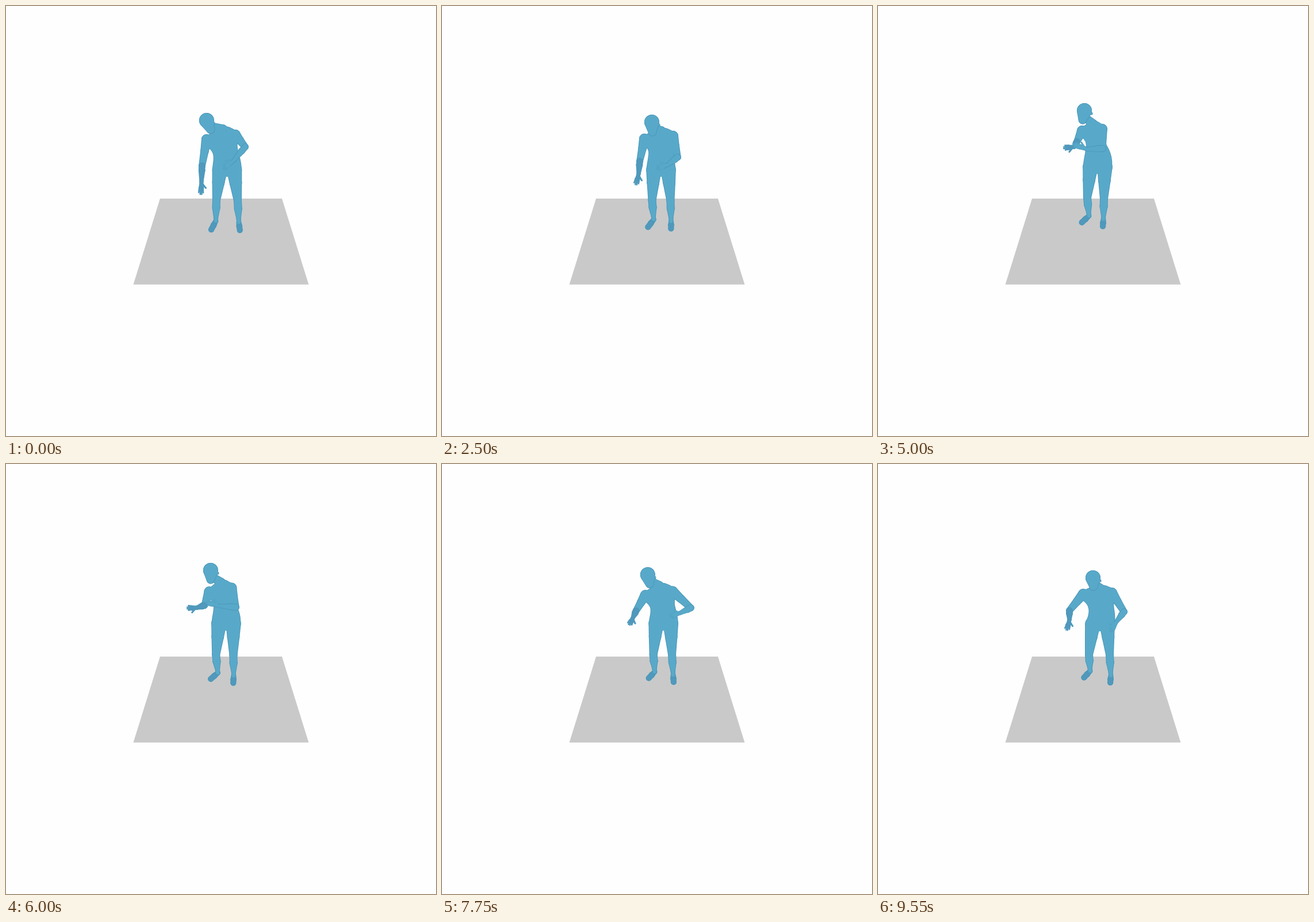
Recreate the animation shown at these times as an HTML page with a canvas. Size 748 by 748 pixels, loop 9.6 s.

```html
<!DOCTYPE html>
<html lang="en">
<head>
<meta charset="utf-8">
<title>Figure study</title>
<style>
html, body { margin: 0; width: 100%; height: 100%; overflow: hidden; background: #fefefe; }
canvas { display: block; width: 748px; height: 748px; }
</style>
</head>
<body>
<canvas id="stage" width="748" height="748"></canvas>
<script>
const ctx = document.getElementById('stage').getContext('2d');
const LOOP = 9600, STEP = 50;
const MAIN = '#58a9c9', EDGE = '#4b96b8', SHADE = '#5099bc';
const tracks = {};

// A pose names only the joints it pins; the others glide through.
function pose(t, joints) {
  for (const name in joints) (tracks[name] ||= []).push([t, ...joints[name]]);
}
const head = (cx, cy, jx, jy, nx, ny) => ({ crown: [cx, cy], jaw: [jx, jy], neck: [nx, ny] });
const arm = (s, ex, ey, wx, wy, tx, ty) =>
  ({ [s + 'Elbow']: [ex, ey], [s + 'Wrist']: [wx, wy], [s + 'Tip']: [tx, ty] });
const trunk = (lx, ly, rx, ry, wx, wy, px, py) =>
  ({ lSho: [lx, ly], rSho: [rx, ry], waist: [wx, wy], hip: [px, py] });
const leg = (s, kx, ky, ax, ay, tx, ty) =>
  ({ [s + 'Knee']: [kx, ky], [s + 'Ankle']: [ax, ay], [s + 'Toe']: [tx, ty] });

pose(0, { ...head(349, 199, 356, 215, 377, 214), ...trunk(349, 232, 399, 224, 384.5, 262, 384.5, 285),
  ...arm('l', 341, 278, 340, 305, 339, 330), ...arm('r', 416, 245, 396, 269, 377, 284),
  ...leg('l', 366, 337, 365, 374, 356, 391), ...leg('r', 403, 338, 405, 376, 407, 392) });
pose(450, arm('l', 339, 274, 336, 303, 331, 326));
pose(1000, { ...head(361, 183, 363, 200, 379, 207), ...trunk(351, 223, 402, 217, 383, 260, 383, 285),
  ...arm('l', 345, 267, 345, 291, 342, 312), ...arm('r', 418, 252, 398, 270, 378, 284) });
pose(1500, { ...head(363, 201, 363, 219, 381, 217), ...trunk(351, 231, 401, 225, 382, 267, 382.5, 286),
  ...arm('l', 348, 274, 358, 299, 366, 320), ...arm('r', 412, 262, 395, 281, 374, 296),
  ...leg('l', 365, 337, 367, 373, 357, 389), ...leg('r', 399, 338, 402, 375, 403, 390) });
pose(2500, { ...head(365, 202, 366, 219, 381, 217), ...trunk(352, 231, 402, 226, 381, 265, 381, 285),
  ...arm('l', 344, 270, 342, 292, 337, 313), ...arm('r', 410, 263, 393, 276, 372, 284) });
pose(3000, head(367, 198, 367, 214, 380, 214));
pose(3500, { ...head(369, 178, 369, 192, 378, 206), ...trunk(355, 217, 402, 216, 380, 255, 380, 284),
  ...arm('l', 348, 256, 349, 277, 347, 296), ...arm('r', 408, 256, 390, 264, 366, 265),
  ...leg('l', 366, 338, 369, 369, 357, 383), ...leg('r', 396, 338, 395, 374, 394, 388) });
pose(4100, { ...head(364, 173, 362, 189, 376, 202), ...trunk(354, 212, 398, 211, 381, 254, 381, 283),
  ...arm('l', 338, 237, 322, 240, 302, 243), ...arm('r', 397, 249, 369, 250, 344, 245) });
pose(5000, { ...head(359, 182, 356, 198, 374, 205), ...trunk(355, 217, 390, 214, 383, 255, 382, 280),
  ...arm('l', 346, 236, 341, 245, 321, 247), ...arm('r', 391, 248, 363, 249, 337, 240),
  ...leg('l', 364, 333, 367, 365, 353, 378), ...leg('r', 393, 335, 392, 371, 391, 385) });
pose(6000, { ...head(356, 185, 356, 201, 374, 206), ...arm('r', 400, 249, 372, 247, 346, 240) });
pose(6400, arm('l', 345, 252, 330, 253, 311, 253));
pose(7000, { ...head(350, 194, 356, 209, 375, 211), ...trunk(352, 226, 397, 217, 384, 255, 384, 276),
  ...arm('l', 347, 263, 356, 268, 357, 281), ...arm('r', 413, 242, 392, 237, 366, 229),
  ...leg('l', 367, 331, 370, 362, 357, 374), ...leg('r', 399, 331, 401, 367, 401, 381) });
pose(7600, { ...head(356, 192, 360, 208, 377, 211), ...arm('l', 337, 255, 331, 266, 323, 280),
  ...arm('r', 434, 248, 416, 255, 397, 261) });
pose(8500, { ...head(367.5, 199, 368, 215, 382, 217), ...trunk(356, 229, 405, 225, 388, 260, 386, 279),
  ...arm('l', 344, 261, 348, 281, 348, 299), ...arm('r', 419, 261, 402, 273, 381, 281),
  ...leg('l', 368, 331, 370, 361, 359, 374), ...leg('r', 401, 331, 403, 367, 404, 381) });
pose(9550, { ...head(374, 198, 375, 213, 386, 216), ...trunk(357, 226, 407, 224, 390, 260, 386, 279),
  ...arm('l', 333, 255, 333, 271, 328, 291), ...arm('r', 428, 257, 415, 274, 404, 293),
  ...leg('l', 367, 331, 369, 360, 357, 373), ...leg('r', 403, 331, 405, 368, 404, 382) });

// Monotone cubic through the keys, so nothing overshoots.
function sample(keys, t) {
  const last = keys.length - 1;
  if (t >= keys[last][0]) return keys[last].slice(1);
  let i = 0;
  while (keys[i + 1][0] <= t) i++;
  const span = keys[i + 1][0] - keys[i][0], u = (t - keys[i][0]) / span;
  const slope = (n, a) => (keys[n + 1][a] - keys[n][a]) / (keys[n + 1][0] - keys[n][0]);
  const tangent = (n, a) => {
    if (n === 0) return slope(0, a);
    if (n === last) return slope(last - 1, a);
    const p = slope(n - 1, a), q = slope(n, a);
    return p * q > 0 ? 2 * p * q / (p + q) : 0;
  };
  return [1, 2].map(a => {
    const p = keys[i][a], q = keys[i + 1][a];
    const v = u * u * (3 - 2 * u);
    return p + (q - p) * v + span * u * (1 - u) * (tangent(i, a) * (1 - u) - tangent(i + 1, a) * u);
  });
}

const mix = (a, b, k) => [a[0] + (b[0] - a[0]) * k, a[1] + (b[1] - a[1]) * k];
const add = (p, x, y) => [p[0] + x, p[1] + y];

// Tapered limb: a run of [point, radius] pairs.
function limb(run, inset = 0) {
  run.forEach(([p, radius], i) => {
    const r = Math.max(radius - inset, 0.4);
    ctx.beginPath();
    ctx.arc(p[0], p[1], r, 0, 7);
    ctx.fill();
    if (!i) return;
    const [o, before] = run[i - 1], s = Math.max(before - inset, 0.4);
    const dx = p[0] - o[0], dy = p[1] - o[1], len = Math.hypot(dx, dy);
    if (len <= Math.abs(r - s)) return;
    const a = Math.atan2(dy, dx), b = Math.acos((s - r) / len);
    ctx.beginPath();
    ctx.arc(o[0], o[1], s, a + b, a - b + 2 * Math.PI);
    ctx.arc(p[0], p[1], r, a - b, a + b);
    ctx.fill();
  });
}

function blob(pts) {
  ctx.beginPath();
  pts.forEach((p, i) => {
    const m = mix(p, pts[(i + 1) % pts.length], 0.5);
    if (!i) ctx.moveTo(...mix(pts[pts.length - 1], p, 0.5));
    ctx.quadraticCurveTo(...p, ...m);
  });
  ctx.fill();
}

function torso(j, e) {
  const { neck, lSho, rSho, waist, hip } = j;
  blob([
    add(neck, 3, e - 7), add(rSho, -2, e - 10), add(rSho, 9 - e, -1), add(rSho, 2 - e, 18),
    add(waist, 22.5 - e, 0), add(hip, 26.5 - e, 0), add(hip, 17 - e, 15), add(hip, 0, 11),
    add(hip, e - 17, 15), add(hip, e - 26.5, 0), add(waist, e - 22.5, 0),
    add(lSho, 8 + e, 18), add(lSho, e - 8, 6), add(lSho, 2, e - 9)
  ]);
}

function thighAndCalf(j, s, e) {
  const root = add(j.hip, s === 'l' ? -12.5 : 12.5, 0);
  const knee = j[s + 'Knee'], ankle = j[s + 'Ankle'];
  limb([[root, 13.3], [mix(root, knee, 0.42), 10.8], [knee, 7],
    [mix(knee, ankle, 0.38), 7], [mix(knee, ankle, 0.85), 4], [ankle, 4]], e);
}

function foot(j, s) {
  const ankle = j[s + 'Ankle'], toe = mix(j[s + 'Toe'], j[s + 'Ankle'], 0.12);
  const run = [[ankle, 4.3], [mix(ankle, toe, 0.5), 5.2], [toe, 5]];
  ctx.fillStyle = EDGE;
  limb(run);
  ctx.fillStyle = SHADE;
  limb(run, 1);
}

function upperArm(j, s, e) {
  const sho = j[s + 'Sho'], elbow = j[s + 'Elbow'];
  limb([[sho, 9], [mix(sho, elbow, 0.45), 7.2], [elbow, 5.8]], e);
}

function forearm(j, s, e) {
  const elbow = j[s + 'Elbow'], wrist = j[s + 'Wrist'], tip = j[s + 'Tip'];
  limb([[elbow, 5.8], [mix(elbow, wrist, 0.3), 5.8], [wrist, 3.6]], e);
  const len = Math.hypot(tip[0] - wrist[0], tip[1] - wrist[1]) || 1;
  const dx = (tip[0] - wrist[0]) / len, dy = (tip[1] - wrist[1]) / len;
  const side = s === 'l' ? 1 : -1;
  const at = (along, across) =>
    add(wrist, dx * along + dy * across * side, dy * along - dx * across * side);
  limb([[wrist, 3.4], [at(len * 0.45, 0), 4.2]], e);
  const slim = e * 0.3;
  [-3.6, -1.2, 1.2, 3.6].forEach(f =>
    limb([[at(len * 0.45, f * 0.8), 1.7], [at(len * (1 - Math.abs(f) * 0.05) - 1, f * 1.1), 1.1]], slim));
  limb([[at(len * 0.2, 2), 2], [at(len * 0.45, 8), 1.3]], slim);
}

function skull(j, e) {
  const { crown, jaw } = j;
  limb([[crown, 13], [jaw, 7.4]], e);
  limb([[add(crown, 12, 5), 2.6]], e);
}

function draw(t) {
  const j = {};
  for (const name in tracks) j[name] = sample(tracks[name], t);

  ctx.fillStyle = '#fefefe';
  ctx.fillRect(0, 0, 748, 748);
  ctx.fillStyle = '#c9c9c9';
  ctx.beginPath();
  ctx.moveTo(268, 335);
  ctx.lineTo(480, 335);
  ctx.lineTo(526.5, 484.5);
  ctx.lineTo(221.5, 484.5);
  ctx.fill();

  const sides = ['l', 'r'];
  sides.forEach(s => foot(j, s));
  for (const [colour, e] of [[EDGE, 0], [MAIN, 1]]) {
    ctx.fillStyle = colour;
    torso(j, e);
    limb([[mix(j.crown, j.jaw, 0.6), 7], [j.neck, 8]], e);
    sides.forEach(s => {
      thighAndCalf(j, s, e);
      upperArm(j, s, e);
    });
  }
  for (const [colour, e] of [[EDGE, 0], [MAIN, 0.9]]) {
    ctx.fillStyle = colour;
    skull(j, e);
  }
  sides.forEach(s => {
    ctx.fillStyle = EDGE;
    forearm(j, s, 0);
    ctx.fillStyle = s === 'l' ? SHADE : MAIN;
    forearm(j, s, 0.9);
  });
}

const start = performance.now();
function tick() {
  const t = (performance.now() - start) % LOOP;
  draw(Math.floor(t / STEP) * STEP);
  requestAnimationFrame(tick);
}
tick();
</script>
</body>
</html>
```
